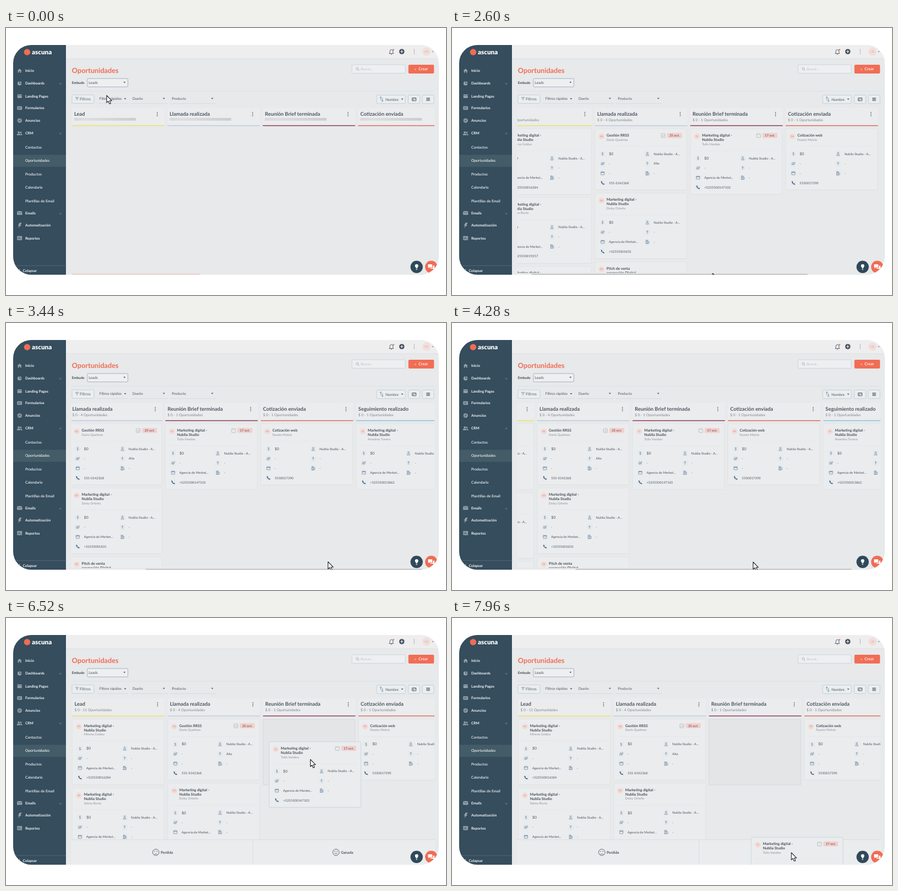
An HTML page for the animation above (8000 ms loop, 800 by 487 pixels).

```html
<!DOCTYPE html>
<html lang="es">
<head>
<meta charset="utf-8">
<title>Oportunidades</title>
<style>
html, body { margin: 0; width: 100%; height: 100%; overflow: hidden; background: #fff; }
svg { display: block; width: 100vw; height: 100vh; }
text { font-family: Lato, "Open Sans", sans-serif; text-rendering: geometricPrecision; white-space: pre; }
</style>
</head>
<body>
<svg id="stage" viewBox="0 0 800 487"></svg>
<script>
const INK = '#4b5762', NAVY = '#354d5d', ORANGE = '#f06c54', BLUE = '#68839f', MUTED = '#8d959c';
const LOOP = 8000, STEP = 40, LOADED = 880, DRAG = 6160;
const COL_W = 173.4, VIEW_X = 119, VIEW_W = 660, CARD_W = 167;

// y is the middle of the capital letters
const text = (x, y, s, size, fill = INK, weight = 400, anchor = 'start') =>
  `<text x="${x}" y="${y + size * 0.36}" font-size="${size}" fill="${fill}" font-weight="${weight}" text-anchor="${anchor}">${s}</text>`;
const rect = (x, y, w, h, fill, stroke = 'none', r = 0, sw = 0.8) =>
  `<rect x="${x}" y="${y}" width="${w}" height="${h}" rx="${r}" fill="${fill}" stroke="${stroke}" stroke-width="${sw}"/>`;
const circle = (x, y, r, fill, stroke = 'none', sw = 0.9) =>
  `<circle cx="${x}" cy="${y}" r="${r}" fill="${fill}" stroke="${stroke}" stroke-width="${sw}"/>`;
const line = (d, stroke, sw = 0.8) =>
  `<path d="${d}" fill="none" stroke="${stroke}" stroke-width="${sw}" stroke-linecap="round" stroke-linejoin="round"/>`;
const shape = (d, fill) => `<path d="${d}" fill="${fill}"/>`;
const at = (x, y, body) => `<g transform="translate(${x} ${y})">${body}</g>`;
const group = (id, body) => `<g id="${id}">${body}</g>`;
const caret = (x, y) => shape(`M${x - 2} ${y - 1}h4l-2 2.4z`, '#56616c');

// Card icons, drawn around 0,0
const icons = {
  money: text(0, 0, '$', 7, BLUE, 400, 'middle'),
  deal: line('M-3.2 1.6L-1.4 -2.2L.4 -1L3 -2.2L1.6 1.8L-.6 2.4L.8 -.6M-2 2.6L-.8 .4', BLUE, 0.7),
  date: rect(-3, -2.6, 6, 5.4, 'none', BLUE, 0.5, 0.7) + line('M-3 -1.4H3', BLUE, 0.9),
  phone: line('M-2.3 -2.2Q-1.8 1.8 2.3 2.4', '#3b5f83', 1.2) + line('M-2.2 -2.4L-1.3 -1.2M1.2 1.5L2.4 2.2', '#3b5f83', 1.6),
  person: circle(0, -1.5, 1.4, 'none', BLUE, 0.7) + line('M-2.4 2.8Q-2.2 .5 0 .5T2.4 2.8Z', BLUE, 0.7),
  up: line('M0 2.4V-2.4M-1.8 -.7L0 -2.4L1.8 -.7', BLUE, 0.7),
  firm: rect(-2.4, -3, 3, 6, 'none', BLUE, 0, 0.7) + line('M.8 -.8H2.8V3H-2.8M-1.6 -1.6H-.2M-1.6 0H-.2', BLUE, 0.7)
};

const AGENCY = 'Agencia de Merket...', OWNER = 'Nublia Studio - A...';
const campaign = (name, phone, due) =>
  ({ title: ['Marketing digital -', 'Nublia Studio'], name, phone, due, kind: AGENCY });
const moving = campaign('Tulio Vandeo', '+5255500147103', '17 oct.');
const columns = [
  { title: 'Lead', count: 11, color: '#ece25c', cards: [
    campaign('Mirena Colduz', '+525550016384'),
    campaign('Selma Ruvio', '+525550019257'),
    campaign('Selma Ruvio', '+525550012046')] },
  { title: 'Llamada realizada', count: 4, color: '#bccbdd', cards: [
    { title: ['Gestión RRSS'], name: 'Darío Quelmes', phone: '555-0142368', due: '25 oct.', done: true, level: 'Alta' },
    campaign('Delsy Orteño', '+52555001831'),
    { title: ['Pitch de venta', 'promoción Digital'], name: 'Delsy Orteño', phone: '-' }] },
  { title: 'Reunión Brief terminada', count: 1, color: '#8a3150', cards: [moving] },
  { title: 'Cotización enviada', count: 1, color: '#de6357', cards: [
    { title: ['Cotización web'], name: 'Fausto Molviz', phone: '5550017390' }] },
  { title: 'Seguimiento realizado', count: 1, color: '#86bfe6', cards: [
    campaign('Anselmo Tuvera', '+525550013862')] }
];
const cardHeight = card => card.title.length > 1 ? 119.5 : 111;

function drawCard(card, border = '#dfe3e6') {
  const drop = (card.title.length - 1) * 8, h = cardHeight(card);
  const initials = card.name.split(' ').map(w => w[0]).join('');
  let out = rect(0, 0.8, CARD_W, h, '#dfe1e3', 'none', 2) + rect(0, 0, CARD_W, h, '#ebeced', border, 2, 0.7)
    + circle(12, 13.5, 5.3, '#f1dcd8') + text(12, 13.5, initials, 3.6, '#e08c80', 700, 'middle');
  card.title.forEach((s, i) => out += text(21.2, 11.6 + i * 8, s, 6.7, '#46505a', 700));
  out += text(21.2, 19.6 + drop, card.name, 5.9, MUTED) + line(`M8 ${32 + drop}H159`, '#e0e3e5', 0.6);
  if (card.due) {
    out += rect(120.5, 8.8, 7, 7, 'none', '#a5afb7', 0.8, 0.7)
      + (card.done ? line('M122.4 12.4L123.8 14L126.2 11', '#98a3ac', 0.7) : line('M121 10.4H127', '#c2c9ce', 0.6))
      + rect(131.2, 7.4, 27, 9, '#f0d0ce', 'none', 1.5) + text(144.7, 11.9, card.due, 6, '#96615f', 700, 'middle');
  }
  const rows = [
    ['money', '$0', 'person', OWNER], ['deal', '-', 'up', card.level || '-'],
    ['date', card.kind || '-', 'firm', '-'], ['phone', card.phone]
  ];
  rows.forEach(([iconA, a, iconB, b], i) => {
    const y = 45.5 + drop + i * 17.7;
    const field = (x, name, s, size) =>
      rect(x - 5.2, y - 5.2, 10.4, 10.4, '#e6eaed', 'none', 2) + at(x, y, icons[name]) + text(x + 11.4, y, s, size, INK);
    out += field(14, iconA, a, i ? 5.9 : 6.9);
    if (iconB) out += field(95.3, iconB, b, 5.9);
  });
  return out;
}

function drawHead(col, i) {
  const dots = [-3, 0, 3].map(d => circle(155, 157 + d, 0.85, '#3d4751')).join('');
  return at(120 + i * COL_W, 0,
    rect(0, 146, 168, 32, '#ebeced') + rect(0, 177.4, 168, 1.4, col.color)
    + text(4, 156.2, col.title, 9.3, INK, 700) + dots);
}

function drawCards(col, i) {
  let y = 184;
  return at(120 + i * COL_W, 0, text(4, 167.2, `$ 0 - ${col.count} Oportunidades`, 6.6, '#7d868e')
    + col.cards.map(card => {
      const out = at(0, y, drawCard(card));
      y += cardHeight(card) + 6.1;
      return card === moving ? group('home', out) : out;
    }).join(''));
}

function drawSidebar() {
  const tint = '#93a3ad', white = '#f3f5f6';
  const glyph = {
    home: shape('M-4 0L0 -3.8L4 0H3V3.6H1V1H-1V3.6H-3V0Z', tint),
    pie: circle(0, 0, 3.8, tint) + line('M0 -4V0H4', NAVY, 1),
    page: rect(-4, -3.4, 8, 6.8, tint, 'none', 0.8) + line('M-4 -1.4H4', NAVY, 0.7),
    form: rect(-4.4, -3.2, 8.8, 6.4, tint, 'none', 1) + line('M-2.6 -.8H2.6M-2.6 1H1', NAVY, 0.8),
    ad: circle(0, 0, 4, tint) + line('M-2 -2L1 1M1 -3V1H-3', NAVY, 0.8),
    crm: circle(-1.6, -1.8, 1.8, tint) + circle(2.2, -1.6, 1.5, tint) + shape('M-5 3.4Q-5 .6 -1.6 .6T1.8 3.4ZM2.4 3.4Q2.4 1.6 1.6 .8Q5 .4 5 3.4Z', tint),
    mail: rect(-4.6, -3.4, 9.2, 6.8, tint, 'none', 0.8) + line('M-4 -2.4L0 .6L4 -2.4', NAVY, 0.9),
    bolt: shape('M0 -5H4L1.4 -1H3.6L-3 5L-.8 .4H-3Z', tint),
    chart: rect(-4.4, -3.8, 8.8, 7.6, tint, 'none', 0.8) + line('M-2.4 2V-1M0 2V-2M2.4 2V.6', NAVY, 1)
  };
  const main = [
    ['home', 'Inicio', 78], ['pie', 'Dashboards', 101], ['page', 'Landing Pages', 124.4],
    ['form', 'Formularios', 146], ['ad', 'Anuncios', 168.8], ['crm', 'CRM', 192],
    ['mail', 'Emails', 337.4], ['bolt', 'Automatización', 360], ['chart', 'Reportes', 383.2]
  ];
  const sub = ['Contactos', 'Oportunidades', 'Productos', 'Calendario', 'Plantillas de Email'];
  return rect(13, 31, 96, 419, NAVY) + rect(13, 231.3, 96, 22, '#435c68')
    + circle(38.4, 44, 5.8, ORANGE) + text(47, 43.3, 'ascuna', 11.7, '#fff', 900)
    + main.map(([g, s, y]) => at(24.7, y, glyph[g]) + text(35, y, s, 6.6, white, 700)).join('')
    + sub.map((s, i) => text(35, 217.3 + i * 24.5, s, 6.7, '#fff', 500)).join('')
    + line('M97.2 101l1.6 1.5l1.6 -1.5M97.2 338l1.6 1.5l1.6 -1.5M97.2 193l1.6 -1.5l1.6 1.5', '#a9b6be', 0.7)
    + line('M13 433.4H109', '#62757f', 0.7)
    + line('M25 440l-2.4 2.6l2.4 2.6', white, 1) + text(30.5, 442.6, 'Colapsar', 6.6, white, 700);
}

function drawToolbar() {
  const edge = '#b9cad6', pale = '#eeeff0';
  return rect(109, 31, 678, 25, '#eeeeef') + line('M109 56H787', '#d9dcde', 0.8)
    + line('M697 46.5H704.6L703.6 45V42Q703.6 39.5 700.8 39.5T698 42V45L697 46.5M700 48H701.6', '#4b5967', 0.9) + circle(704.6, 39.6, 1.3, ORANGE)
    + circle(719.6, 43, 4.8, '#44515f') + line('M717.2 43H722M719.6 40.6V45.4', '#fff', 1)
    + line('M742.2 38.5V47.5', '#9da5ab', 0.8)
    + circle(764.6, 43, 7.6, '#f0dfdc') + text(764.6, 43, 'HE', 5.4, '#e6aca3', 400, 'middle') + shape('M774 42.2h4l-2 2.2z', '#9299a0')
    + text(119.8, 77.2, 'Oportunidades', 12.7, ORANGE, 700)
    + rect(629, 67, 97, 15.6, pale, '#c0cfda', 1.5) + circle(638.6, 74.2, 2.2, 'none', '#9aabb8', 0.8) + line('M640.2 76L642 77.8', '#9aabb8', 0.9)
    + text(645, 75, 'Buscar...', 6.2, '#bcc4ca')
    + rect(731.6, 67, 46.6, 16, '#f16d55', 'none', 2) + text(742, 74.8, '+', 7.5, '#f9d6cf') + text(750, 74.8, 'Crear', 7.1, '#fbebe8', 700)
    + text(119.8, 99.8, 'Embudo', 6.2, '#3d4751', 700)
    + rect(148, 92.2, 73.6, 15.2, pale, '#93a5c0', 1.5) + text(150.3, 99.8, 'Leads', 6.7) + caret(215.4, 99)
    + line('M120 115.2H778', '#dcdfe1', 0.7)
    + rect(120, 122, 40, 15.4, '#ebeeef', edge, 1.5) + line('M126.4 126.6H132M127.4 128.8H131M128.6 131H129.8', '#6a7a88', 0.8) + text(134, 129, 'Filtros', 7.3, '#5c6771')
    + text(169.8, 129, 'Filtros rápidos', 6.5) + caret(216.6, 129)
    + text(230, 128.4, 'Dueño', 6.4) + caret(287, 128.6)
    + text(301.4, 128.4, 'Producto', 6.4) + caret(375, 128.6)
    + line('M166 137.8H222M227 137.8H294M298 137.8H381', '#cfd5d9', 0.7)
    + rect(674, 122.4, 52, 15.4, '#ebeeef', edge, 1.5) + line('M681.4 131V125.6M679.8 127L681.4 125.4L683 127M684.4 128.4V134M682.8 132.6L684.4 134.2L686 132.6', BLUE, 0.8)
    + text(690, 130.2, 'Nombre', 6.7) + caret(720.4, 129.8)
    + rect(731.4, 122.4, 21, 15.4, '#ebeeef', edge, 1.5) + rect(738.4, 127.4, 7.2, 5.4, 'none', '#4b5967', 0.6, 1) + line('M740 129.4H741.4M740 131.2H741.4M743 129.4H744.4', '#4b5967', 0.9)
    + rect(757, 122.4, 21, 15.4, '#ebeeef', edge, 1.5) + line('M764.6 127.6H770.4M764.6 129.2H770.4M764.6 130.8H770.4M764.6 132.4H770.4', '#4b5967', 0.9);
}

function drawOutcomes() {
  const face = (x, mouth) => circle(x, 427.4, 5.8, 'none', '#4b5663', 0.9)
    + circle(x - 2, 425.8, 0.8, '#4b5663') + circle(x + 2, 425.8, 0.8, '#4b5663')
    + line(`M${x - 2.4} ${430 - mouth}q2.4 ${mouth * 2.4} 4.8 0`, '#4b5663', 0.8);
  return rect(119, 404.4, 661, 46, '#eaeced') + line('M119 404.4H780M449 404.4V450', '#d7dbde', 0.8)
    + face(272.4, -1) + text(281.2, 427.2, 'Perdida', 6.6, INK, 700)
    + face(600, 1) + text(609, 427.2, 'Ganada', 6.6, INK, 700);
}

const drawHelp = () => circle(746.6, 435.8, 11.2, '#30495a')
  + circle(746.6, 433.8, 3, '#fff') + shape('M744.6 435.4H748.6L747.8 438H745.4Z', '#fff') + line('M745.6 439.4H747.6M746 440.8H747.2', '#fff', 0.8)
  + circle(773.2, 435.8, 11.2, ORANGE)
  + shape('M767.4 431H775V436.6H770.4L768.4 438.4V436.6H767.4Z', '#fff')
  + shape('M776.2 433.4H779V439H778V440.8L776 439H771.6V437.6H776.2Z', '#fff');

const bars = columns.map((c, i) => rect(124 + i * COL_W, 164, 112, 5, 'url(#shimmer)')).join('');

document.getElementById('stage').innerHTML = `<defs>
  <clipPath id="window"><rect x="13" y="31" width="774" height="419" rx="33"/></clipPath>
  <clipPath id="view"><rect x="${VIEW_X}" y="140" width="${VIEW_W}" height="306.8"/></clipPath>
  <linearGradient id="shimmer"><stop stop-color="#d6d8da"/><stop id="glow" offset=".2" stop-color="#dcdee0"/><stop offset="1" stop-color="#cbcdcf"/></linearGradient>
</defs><g clip-path="url(#window)">`
  + rect(13, 31, 774, 419, '#e7e9ea') + drawToolbar() + drawSidebar()
  + `<g clip-path="url(#view)">` + group('board',
      columns.map(drawHead).join('') + group('bars', bars) + group('cards', columns.map(drawCards).join(''))
      + group('slot', rect(466.8, 184.5, CARD_W, 119.5, '#e3e5e7', '#d2d7dc', 1, 0.8))
      + group('target', rect(466.8, 310, CARD_W, 51, '#dadcdd')))
  + '</g>'
  + group('progress', rect(120, 448.6, 233, 1.2, '#eeb9b2'))
  + group('thumb', rect(VIEW_X, 448.6, 502, 1.4, '#aeb1b4'))
  + group('railbar', rect(459.4, 178.5, 2.2, 147, '#84a3c2', 'none', 1))
  + group('outcomes', drawOutcomes())
  + group('dragged', drawCard(moving, '#b9d2e2'))
  + drawHelp()
  + group('cursor', '<path d="M0 0V13.2L3 10.5L5.1 15.4L7.5 14.4L5.4 9.7H9.4Z" fill="#fff" stroke="#1d2228" stroke-width="1.1" stroke-linejoin="round"/>')
  + '</g>';

// Steps: [ms, values...], eased in between
const scrollSteps = [[2320, 0], [2600, 33.5], [3160, 177], [3920, 177], [4280, 138.5], [4760, 0]];
const cursorSteps = [
  [160, 183, 123], [840, 410, 425], [1400, 449, 447], [2320, 449, 448], [2600, 474, 447.5], [3160, 585.5, 435.5],
  [3920, 585.5, 435.5], [4280, 547.5, 436], [4760, 449, 436], [4960, 449, 430], [5440, 447.5, 242.5],
  [5600, 447.5, 242.5], [5960, 542, 216], [6240, 542, 216], [7120, 583, 366], [7240, 583, 366], [7640, 617, 428]
];
const grabSteps = [[6240, 75, 32], [7240, 75, 32], [7640, 73, 28]];

function sample(steps, t) {
  const next = steps.findIndex(s => s[0] > t);
  if (next === 0) return steps[0].slice(1);
  if (next < 0) return steps[steps.length - 1].slice(1);
  const a = steps[next - 1], b = steps[next];
  const u = (t - a[0]) / (b[0] - a[0]), k = (u + u * u * (3 - 2 * u)) / 2;
  return a.slice(1).map((v, i) => v + (b[i + 1] - v) * k);
}

const el = id => document.getElementById(id);
const show = (id, on) => el(id).setAttribute('visibility', on ? 'visible' : 'hidden');
const move = (id, x, y) => el(id).setAttribute('transform', `translate(${x.toFixed(2)} ${y.toFixed(2)})`);

function render(t) {
  const [scroll] = sample(scrollSteps, t), [x, y] = sample(cursorSteps, t), [gx, gy] = sample(grabSteps, t);
  const loaded = t >= LOADED, dragging = t >= DRAG, nudge = dragging ? 0.5 : 0;
  move('board', nudge - scroll, nudge);
  move('thumb', scroll * VIEW_W / (COL_W * columns.length), 0);
  move('cursor', x, y);
  move('dragged', x - gx, y - gy);
  el('glow').setAttribute('offset', 0.2 + (t % 800) / 1000);
  show('bars', !loaded);
  show('progress', !loaded);
  show('cards', loaded);
  show('thumb', loaded && !dragging);
  show('railbar', t >= 5120 && t < 5720);
  show('home', loaded && !dragging);
  show('slot', dragging);
  show('target', t >= 6760 && t < 7400);
  show('outcomes', dragging);
  show('dragged', dragging);
}

const start = performance.now();
function tick() {
  const t = (performance.now() - start) % LOOP;
  render(Math.floor(t / STEP) * STEP);
  requestAnimationFrame(tick);
}
render(0);
requestAnimationFrame(tick);
</script>
</body>
</html>
```
